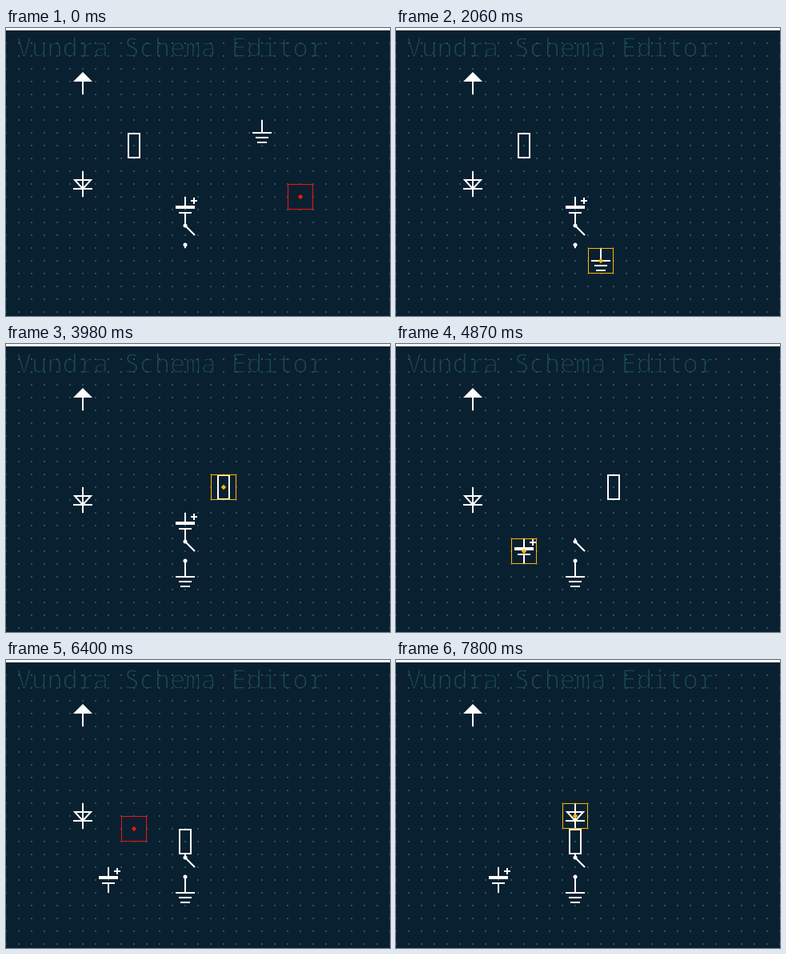
An HTML page for the animation above (8000 ms loop, 480x360 px).

```html
<!DOCTYPE html>
<html lang="en">
<head>
<meta charset="utf-8">
<title>Vundra Schema Editor</title>
<style>
  html, body { margin: 0; width: 100%; height: 100%; overflow: hidden; background: #fff; }
  svg { display: block; width: 480px; height: 360px; }
  /* The stroke in the backdrop colour thins the letters */
  .title {
    font: 100 32px "Noto Sans Mono", "DejaVu Sans Mono", monospace;
    fill: #1c4a4c; stroke: #092030; stroke-width: 1.3;
  }
  .part { fill: none; stroke: #fff; stroke-width: 2; }
  .solid { fill: #fff; stroke: none; }
  #cursor { color: #f01414; }
  #cursor.held { color: #fcb900; }
  #cursor path { fill: none; stroke: currentColor; }
  #cursor .dot { fill: currentColor; stroke: none; }
</style>
</head>
<body>
<svg viewBox="0 0 480 360">
  <defs>
    <pattern id="grid" x="-8" y="11" width="16" height="16" patternUnits="userSpaceOnUse">
      <rect x="7" y="7" width="2" height="2" fill="#2c5258"/>
    </pattern>
  </defs>
  <rect y="3" width="480" height="357" fill="#092030"/>
  <text class="title" x="13" y="36">Vundra Schema Editor</text>
  <rect y="11" width="480" height="349" fill="url(#grid)"/>

  <g class="part" id="supply">
    <path class="solid" d="M0-12 12 0H-12Z"/>
    <path d="M0 0V16"/>
  </g>
  <g class="part" id="switch">
    <path d="M0-16V-12L12 0M0 12V16"/>
    <circle class="solid" cy="-12" r="2.5"/>
    <circle class="solid" cy="12" r="2.5"/>
  </g>
  <g class="part" id="battery">
    <path d="M0-16V-4M-8 4H8M0 4V16M7-11H15M11-15V-7"/>
    <path d="M-12-3H12" stroke-width="4"/>
  </g>
  <g class="part" id="ground">
    <path d="M0-16V0M-12 0H12M-8 6H8M-6 12H6"/>
  </g>
  <g class="part" id="resistor">
    <path d="M-7-15H7V15H-7Z"/>
  </g>
  <g class="part" id="diode">
    <path d="M0-16V16M-12 6H12M-10-5H10L0 6Z"/>
  </g>

  <g id="cursor">
    <path d="M-15.5-15.5H15.5V15.5H-15.5Z"/>
    <path class="dot" d="M0-3.2 3.2 0 0 3.2-3.2 0Z"/>
  </g>
</svg>
<script>
  const LOOP = 8000, STEP = 130, CELL = 16, TOP = 3;

  // Grid cells of the parts at the start of the loop
  const home = {
    supply: [6, 4], switch: [14, 16], battery: [14, 14],
    ground: [20, 8], resistor: [10, 9], diode: [6, 12]
  };

  // Start time, carried part, cells visited one per step
  const moves = [
    [0, "", "23,13"],
    [250, "", "22,14 21,15 20,16 19,17 19,16 19,15 19,14 20,11 20,8"],
    [1420, "ground", "20,8"],
    [1670, "ground", "19,10 18,13 17,16 16,18 14,18"],
    [2690, "", "12,16 11,12 10,9"],
    [3080, "resistor", "10,9 11,10 13,11 14,12"],
    [3850, "resistor", "15,11 17,11"],
    [4230, "", "15,12 14,14"],
    [4740, "battery", "12,15 10,16 8,17"],
    [5130, "", "11,15 14,13 17,11"],
    [5640, "resistor", "17,11 15,13 14,14"],
    [6400, "", "10,13 7,13"],
    [6780, "", "6,13 6,12"],
    [7040, "diode", "6,12"],
    [7290, "diode", "11,11 15,11"],
    [7800, "diode", "14,12"]
  ].map(([start, part, path]) => ({
    start, part, cells: path.split(" ").map(c => c.split(",").map(Number))
  }));

  const cursor = document.getElementById("cursor");

  function place(el, [col, row]) {
    el.setAttribute("transform", `translate(${col * CELL} ${row * CELL + TOP})`);
  }

  function draw(time) {
    const at = { ...home };
    let cell, held;
    for (const { start, part, cells } of moves) {
      if (start > time) break;
      const step = Math.floor((time - start) / STEP);
      cell = cells[Math.min(step, cells.length - 1)];
      held = part;
      if (part) at[part] = cell;
    }
    for (const id in at) place(document.getElementById(id), at[id]);
    place(cursor, cell);
    cursor.classList.toggle("held", held !== "");
  }

  const origin = performance.now();
  function tick() {
    draw((performance.now() - origin) % LOOP);
    requestAnimationFrame(tick);
  }
  tick();
</script>
</body>
</html>
```
